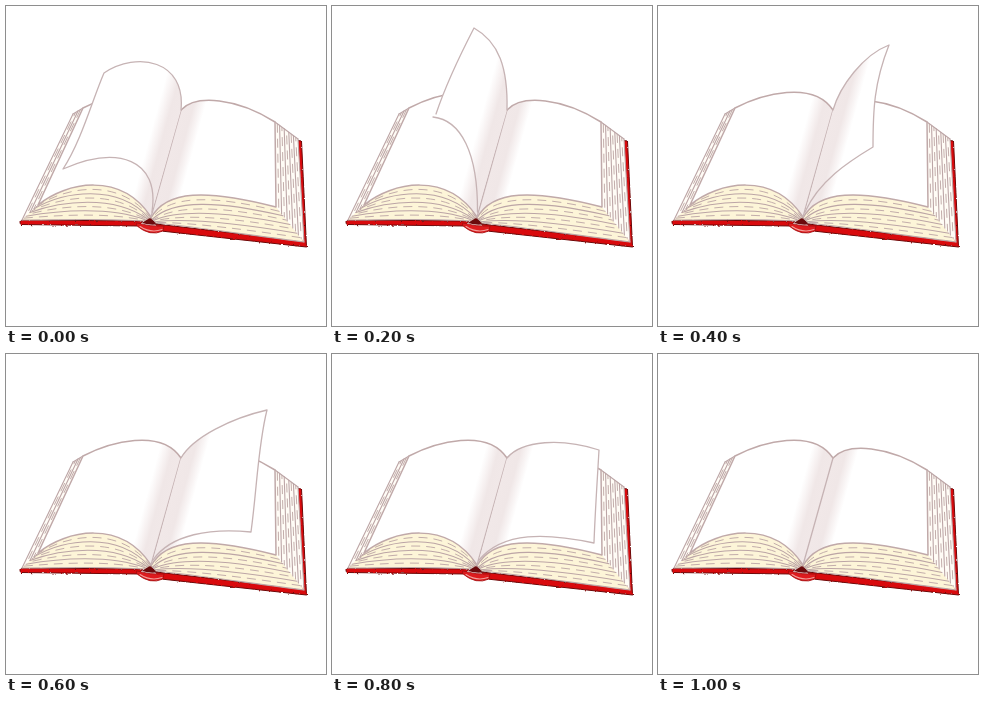
Recreate the animation shown at these times as an HTML page. Size 320 by 320 pixels, loop 1.2 s.

```html
<!DOCTYPE html>
<html lang="en">
<head>
<meta charset="utf-8">
<title>Book turning a page</title>
<style>
  html, body { margin: 0; width: 100%; height: 100%; overflow: hidden; background: #fff; }
  svg { display: block; width: 100%; height: 100%; }
  path { stroke-linecap: round; stroke-linejoin: round; }
  .page { fill: url(#shade); }
  .edge, .leaf, .sheet, .dash { fill: none; }
  .edge { stroke: #c0a9a9; stroke-width: 1.5; }
  .leaf { stroke: #c6b3b4; stroke-width: 1.3; }
  .sheet { stroke: #bca5a6; stroke-width: 1.1; }
  .dash { stroke: #c3adab; stroke-width: 1; stroke-linecap: butt; }
  .foot { fill: #fdf5d8; }
  .side { fill: #fffcf6; }
  .cover { fill: #d90a0d; stroke: #6d0707; stroke-width: 1; }
  .spine { fill: #dd1b1e; stroke: #a00d0f; stroke-width: .8; }
  .gap { fill: #6b0a0c; }
  .shine { fill: none; stroke: #f2a09c; stroke-width: 1.1; }
</style>
</head>
<body>
<svg viewBox="0 0 320 320">
  <defs>
    <linearGradient id="shade" gradientUnits="userSpaceOnUse" x1="138" y1="151.5" x2="182" y2="163.5">
      <stop offset="0" stop-color="#fff"/>
      <stop offset=".14" stop-color="#f8f3f3"/>
      <stop offset=".28" stop-color="#f0e7e7"/>
      <stop offset=".5" stop-color="#f1e8e8"/>
      <stop offset=".75" stop-color="#f0e7e7"/>
      <stop offset=".9" stop-color="#f9f5f5"/>
      <stop offset="1" stop-color="#fff"/>
    </linearGradient>
    <filter id="rough" x="-5%" y="-10%" width="110%" height="120%" color-interpolation-filters="sRGB">
      <feTurbulence type="fractalNoise" baseFrequency=".4" seed="4"/>
      <feDisplacementMap in="SourceGraphic" scale="2.6" xChannelSelector="R" yChannelSelector="G"/>
    </filter>
  </defs>
  <g id="book"></g>
  <g id="leaves"></g>
</svg>
<script>
const STEP = 200, LOOP = 1200;
const NS = 'http://www.w3.org/2000/svg';
const book = document.getElementById('book');
const leaves = document.getElementById('leaves');

function draw(parent, cls, d, attrs = {}) {
  const el = document.createElementNS(NS, 'path');
  el.setAttribute('class', cls);
  el.setAttribute('d', d);
  for (const key in attrs) el.setAttribute(key, attrs[key]);
  parent.append(el);
}

const mix = (a, b, t) => a.map((v, i) => +(v + (b[i] - v) * t).toFixed(2));
const line = p => `M${p.slice(0, 2)}L${p.slice(2)}`;
const curve = p => `M${p.slice(0, 2)}C${p.slice(2)}`;

// Solid sheet edges with a broken one between each pair.
function stack(shape, inner, outer, count) {
  for (let i = 0; i < count; i++) {
    draw(book, 'dash', shape(mix(inner, outer, (i + .5) / count)),
      { 'stroke-dasharray': '9 6', 'stroke-dashoffset': i * 5 });
    draw(book, 'sheet', shape(mix(inner, outer, (i + 1) / count)));
  }
}

// Each block of sheets runs from the open page (inner) to the cover (outer).
const blocks = [
  {
    side: [[77, 102, 32, 199], [67, 108, 16, 214]],
    foot: [[32, 199, 60, 176, 115, 165, 145, 211], [16, 214, 50, 214, 100, 212, 138, 215]],
    sides: 2
  },
  {
    side: [[269, 116, 270, 201], [292, 133, 298, 236]],
    foot: [[270, 201, 200, 183, 160, 184, 145, 212], [298, 236, 250, 230, 190, 221, 150, 217]],
    sides: 5
  }
];

// Cover and spine
const rough = { filter: 'url(#rough)' };
draw(book, 'cover', 'M16 214L137 215L133 220L15 218.5Q12.5 216 16 214Z', rough);
draw(book, 'cover', 'M150 218L296 235L291.5 134.5L295.5 135L300.5 241L155 225Z', rough);
draw(book, 'spine', 'M131 217Q144 221 158 220L157 225Q144 231 131 220Z');
draw(book, 'shine', 'M134 220.5Q145 227.5 156 223.5');
draw(book, 'gap', 'M145 210L136 217Q145 220 153 218Z');

for (const { side: [a, b], foot: [p, q], sides } of blocks) {
  draw(book, 'side', `${line(a)}L${b.slice(2)}L${b.slice(0, 2)}Z`);
  draw(book, 'foot', `${curve(p)}L${q.slice(6)}C${q.slice(4, 6)} ${q.slice(2, 4)} ${q.slice(0, 2)}Z`);
  stack(curve, p, q, 4);
  stack(line, a, b, sides);
  draw(book, 'sheet', `M${a.slice(0, 2)}L${b.slice(0, 2)}`);
}

// Open pages
const left = 'M145 211C115 165 60 176 32 199L77 102C104 88 155 74 175 104';
const right = 'M175 104C190 88 231 92 269 116L270 201C200 183 160 184 145 212';
for (const d of [left, right]) {
  draw(book, 'page', d + 'Z');
  draw(book, 'edge', d);
}
draw(book, 'leaf', 'M175 104Q163 146 145 211');

// Turning leaf: upper edge, free edge and lower edge of each pose
const poses = [
  ['M175 104C180 54 131 45 98 67', 'C87 92 75 136 57 163', 'C112 139 154 153 146 206'],
  ['M175 104C176 62 167 36 142 22', 'C126 53 113 81 104 108', 'M101 111C129 114 146 147 145.5 206'],
  ['M175 104C182 80 205 49 231 39', 'C216 77 215 104 215 141', 'C190 156 161 175 147 206'],
  ['M175 104C187 83 226 64 261 56', 'C252 91 251 134 245 178', 'C205 174 165 180 147 206'],
  ['M175 104C190 86 230 84 267 96', 'C265 131 263 160 262 189', 'C215 179 171 177 147 206']
];

poses.forEach(([top, free, low], i) => {
  const g = document.createElementNS(NS, 'g');
  leaves.append(g);
  draw(g, 'page', top + free + low.replace('M', 'L') + 'Z');
  draw(g, 'leaf', top + free + low);
  const frames = [
    { offset: 0, opacity: i ? 0 : 1 },
    { offset: i * STEP / LOOP, opacity: 1 },
    { offset: (i + 1) * STEP / LOOP, opacity: 0 },
    { offset: 1, opacity: 0 }
  ].map(f => ({ ...f, easing: 'step-end' }));
  g.animate(frames, { duration: LOOP, iterations: Infinity }).startTime = 0;
});
</script>
</body>
</html>
```
